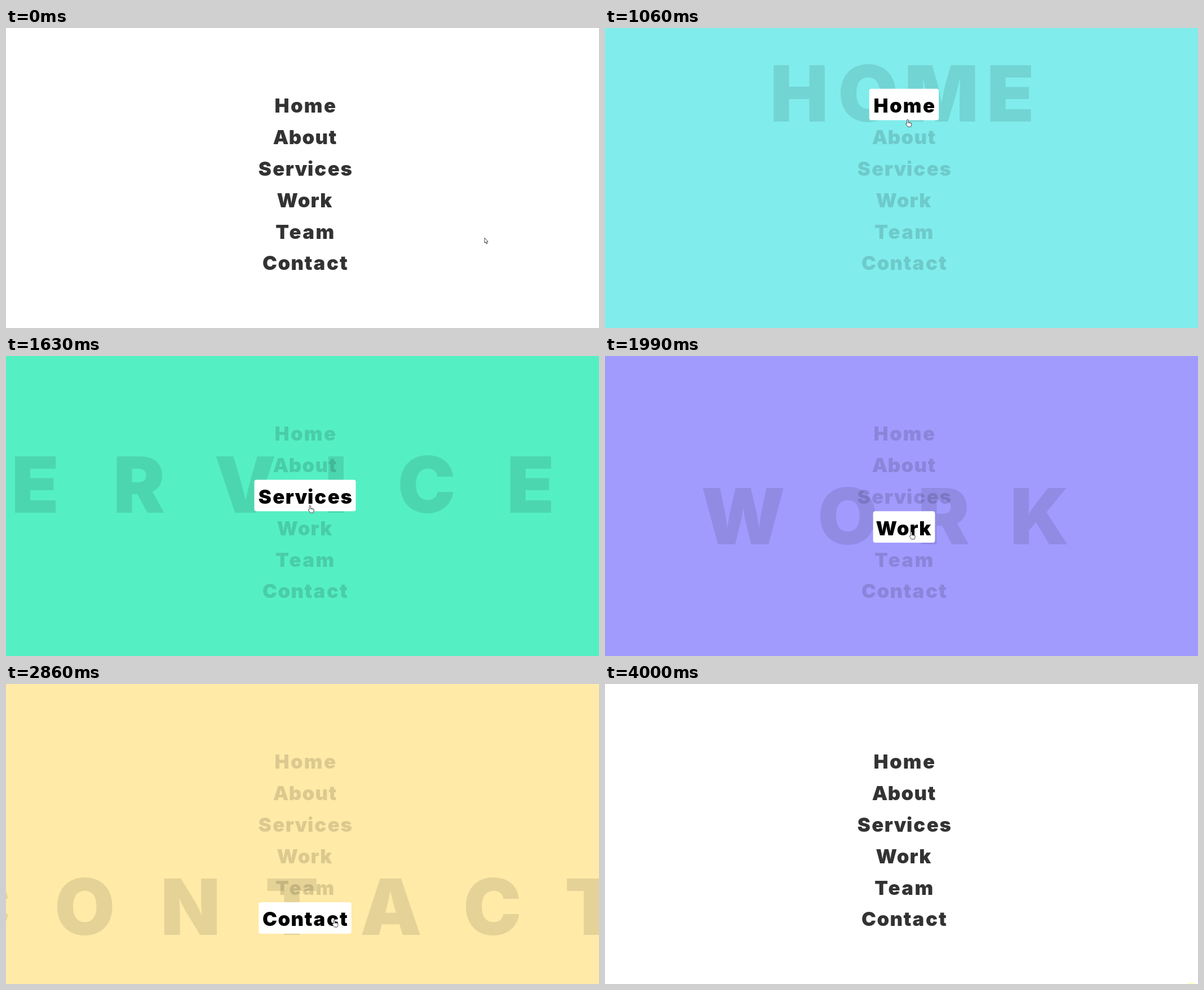
Write an HTML page that moves like this. It is 1052 by 532 pixels and loops after 4.1 s.

```html
<!DOCTYPE html>
<html lang="en">
<head>
<meta charset="utf-8">
<title>Hover menu</title>
<style>
  html, body { margin: 0; width: 100%; height: 100%; overflow: hidden; background: #fff; }
  svg { display: block; width: 100%; height: 100%; }
  text {
    font-family: Inter, "Liberation Sans", Arial, sans-serif;
    font-weight: 900;
    font-optical-sizing: none;
    text-anchor: middle;
  }
</style>
</head>
<body>
<svg id="stage" viewBox="0 0 1052 532">
  <rect id="backdrop" width="1052" height="532"/>
  <text id="banner" font-size="138" fill="#000" fill-opacity=".1"></text>
  <rect id="box" rx="4" fill="#fff"/>
  <g id="menu" font-size="34.7"></g>
  <ellipse id="glow" cx="1039.5" cy="532" rx="4.5" ry="2" fill="#ffff99"/>
  <g id="cursor" fill="#fff" stroke="#333" stroke-width=".9" stroke-linejoin="round">
    <path id="arrow" d="M0 0V9.2L2 7.5 3.4 10.8 4.8 10.2 3.5 7H6.2Z"/>
    <g id="hand">
      <path d="M-1.3 7V1.2a1.2 1.2 0 0 1 2.4 0V5l4.6 1q1.3.4 1.2 1.8L6.3 11 5.4 13H.4L-3 8.6q-.6-1.7.6-1.6z"/>
      <path d="M1.1 5V7M3 5.5V7.3M4.9 6V7.6" fill="none" stroke-width=".6"/>
    </g>
  </g>
</svg>
<script>
const LOOP = 4100, CENTER = 530.5, TOP = 107.7, ROW = 55.85;
const MENU_EM = 35.2, BANNER_EM = 140.8;
const WIDE = 500, TIGHT = 5, EASE_MS = 500;

const items = [
  ["Home", "#81ecec"], ["About", "#ff7675"], ["Services", "#55efc4"],
  ["Work", "#a29bfe"], ["Team", "#fd79a8"], ["Contact", "#ffeaa7"]
];

// Letter advances in em, grouped by width
const advances = {
  ".333": "i", ".389": "I", ".444": "rt", ".611": "sv", ".667": "abceknou",
  ".722": "EST", ".778": "ABCRV", ".833": "HKNOU", ".944": "M", "1": "Wm"
};
const advance = {};
for (const em in advances) for (const ch of advances[em]) advance[ch] = +em;
const kern = { Te: -.045, rv: .05 };

// [start time, hovered item]; -1 means none
const hovers = [
  [0, -1], [30, 1], [480, 0], [1065, 1], [1354, 2],
  [1683, 3], [2138, 4], [2573, 5], [3000, -1]
];

// [time, x, y] of the pointer tip
const path = [
  [0, 849, 372], [29, 849, 372], [30, 590, 196], [310, 581.5, 180],
  [480, 566, 162], [760, 534, 136], [1060, 537, 162], [1354, 538, 219],
  [1630, 539.5, 265], [2138, 545, 331], [2400, 548.5, 377], [2573, 556, 387],
  [2860, 582, 418], [3000, 614, 428], [3290, 888, 464], [3680, 1029, 524],
  [3720, 1045, 540]
];

const $ = id => document.getElementById(id);
const set = (el, attrs) => { for (const k in attrs) el.setAttribute(k, attrs[k]); };
const show = (el, on) => set(el, { visibility: on ? "visible" : "hidden" });

// Centre of every letter, and the width of the whole word
function layout(word, em, spacing) {
  let width = 0;
  const mids = [...word].map((ch, i) => {
    const mid = width + advance[ch] * em / 2;
    width += (advance[ch] + (kern[ch + word[i + 1]] || 0)) * em + spacing;
    return mid;
  });
  return { width, xs: mids.map(m => (CENTER - width / 2 + m).toFixed(2)).join(" ") };
}

// cubic-bezier(.25, .1, .25, 1)
function ease(p) {
  if (p >= 1) return 1;
  const curve = (u, a, b) => 3 * a * u * (1 - u) ** 2 + 3 * b * u * u * (1 - u) + u ** 3;
  let lo = 0, hi = 1;
  for (let i = 0; i < 24; i++) {
    const mid = (lo + hi) / 2;
    if (curve(mid, .25, .25) < p) lo = mid; else hi = mid;
  }
  return curve(lo, .1, 1);
}

function pointAt(t) {
  const i = path.findIndex(k => k[0] > t);
  if (i < 0) return path[path.length - 1].slice(1);
  const [t0, x0, y0] = path[i - 1], [t1, x1, y1] = path[i];
  const p = (t - t0) / (t1 - t0);
  return [x0 + (x1 - x0) * p, y0 + (y1 - y0) * p];
}

const labels = items.map(([word], i) => {
  const el = document.createElementNS("http://www.w3.org/2000/svg", "text");
  set(el, { x: layout(word, MENU_EM, 0).xs, y: TOP + 42.5 + ROW * i });
  el.textContent = word;
  $("menu").append(el);
  return el;
});

function draw(t) {
  const [since, active] = hovers.filter(h => h[0] <= t).pop();
  const hovering = active >= 0;

  for (const id of ["backdrop", "banner", "box"]) show($(id), hovering);
  labels.forEach((el, i) => set(el, {
    fill: !hovering ? "#333" : i === active ? "#000" : "rgba(0,0,0,.14)"
  }));

  if (hovering) {
    const [word, color] = items[active];
    const top = TOP + ROW * active;
    const boxWidth = layout(word, MENU_EM, 0).width + 12;
    const spacing = WIDE + (TIGHT - WIDE) * ease((t - since) / EASE_MS);
    const caps = word.toUpperCase();
    set($("backdrop"), { fill: color });
    set($("box"), { x: CENTER - boxWidth / 2, y: top, width: boxWidth, height: ROW });
    set($("banner"), { x: layout(caps, BANNER_EM, spacing).xs, y: top + 58.5 });
    if ($("banner").textContent !== caps) $("banner").textContent = caps;
  }

  const [x, y] = pointAt(t);
  set($("cursor"), { transform: `translate(${x.toFixed(2)} ${y.toFixed(2)})` });
  show($("arrow"), !hovering && t < 3720);
  show($("hand"), hovering);
  show($("glow"), t >= 4000);
}

const start = performance.now();
function tick() {
  draw((performance.now() - start) % LOOP);
  requestAnimationFrame(tick);
}
tick();
</script>
</body>
</html>
```
